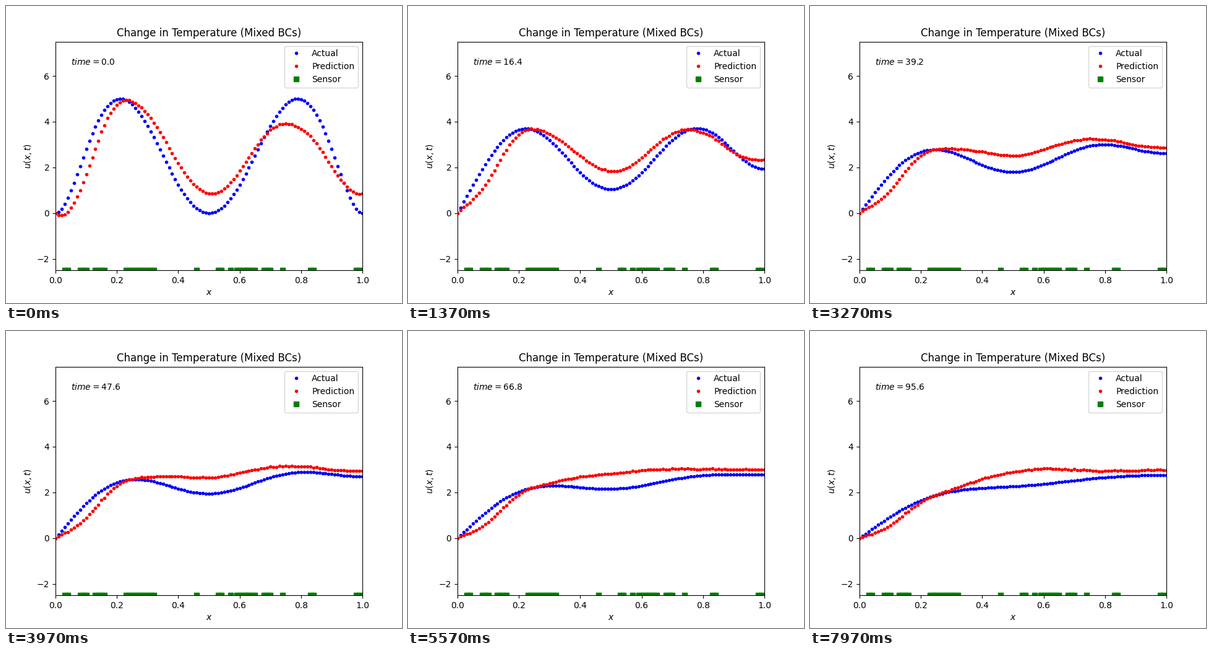
A matplotlib script that plays this animation: 640x480 px, repeating every 8 s.

```python
import numpy as np
import matplotlib.pyplot as plt
from matplotlib.animation import FuncAnimation

LOOP_MS, STEPS = 8000, 240
TICK_MS = 20       # redraw grid, finer than one step so steps change on time
DT = 0.4           # model time per step
ALPHA = 0.0003     # diffusivity
x = np.linspace(0, 1, 101)

# Heat equation: u = 0 at the left end, insulated at the right end.
waves = (np.arange(60) + 0.5) * np.pi
fine = (np.arange(4000) + 0.5) / 4000


def initial(s):
    return 2160 * (s * (s - 0.5) * (s - 1)) ** 2


coefs = 2 * np.sin(np.outer(waves, fine)) @ initial(fine) / fine.size
modes = np.sin(np.outer(x, waves))


def heat(t):
    if t == 0:
        return initial(x)
    return modes @ (coefs * np.exp(-ALPHA * waves**2 * t))


# Prediction error: fading bumps (height, centre, width, decay rate)
# on top of a lasting offset to the right.
BUMPS = [
    (-1.10, 0.10, 0.060, 0.0115),
    (0.28, 0.32, 0.050, 0.077),
    (0.55, 0.41, 0.075, 0.020),
    (0.45, 0.57, 0.120, 0),
    (-1.62, 0.82, 0.090, 0.077),
    (0.85, 1.00, 0.050, 0.077),
]
offset = 0.22 / (1 + np.exp((0.37 - x) / 0.04))
ripple = np.random.default_rng(4).normal(0, 0.012, x.size)
pinned = np.tanh(x / 0.025)    # no error at the fixed end


def error(t):
    total = offset + ripple
    for height, centre, width, rate in BUMPS:
        shape = np.exp(-((x - centre) / width) ** 2 / 2)
        total = total + height * shape * np.exp(-rate * t)
    return total * pinned


# Sensors sit on runs of neighbouring grid points (first, last).
runs = [(3, 4), (8, 10), (13, 16), (23, 32), (46, 46), (53, 54), (57, 57),
        (59, 65), (68, 70), (74, 74), (83, 84), (98, 99)]
sensors = np.concatenate([x[a:b + 1] for a, b in runs])

fig, ax = plt.subplots(figsize=(6.4, 4.8), dpi=100)
ax.set(xlim=(0, 1), ylim=(-2.5, 7.5), xlabel="$x$", ylabel="$u(x,t)$",
       title="Change in Temperature (Mixed BCs)")
actual, = ax.plot([], [], "b.", label="Actual")
pred, = ax.plot([], [], "r.", label="Prediction")
ax.plot(sensors, np.full(sensors.size, -2.5), "gs", label="Sensor")
clock = ax.text(0.05, 6.5, "")
ax.legend(loc="upper right")


def draw(i):
    step = int((i + 0.75) * TICK_MS * STEPS / LOOP_MS)
    t = step * DT
    u = heat(t)
    actual.set_data(x, u)
    pred.set_data(x, u + error(t))
    clock.set_text(f"$time = {t:.1f}$")
    return actual, pred, clock


anim = FuncAnimation(fig, draw, frames=LOOP_MS // TICK_MS, interval=TICK_MS,
                     repeat=True, repeat_delay=0)
plt.show()
```
